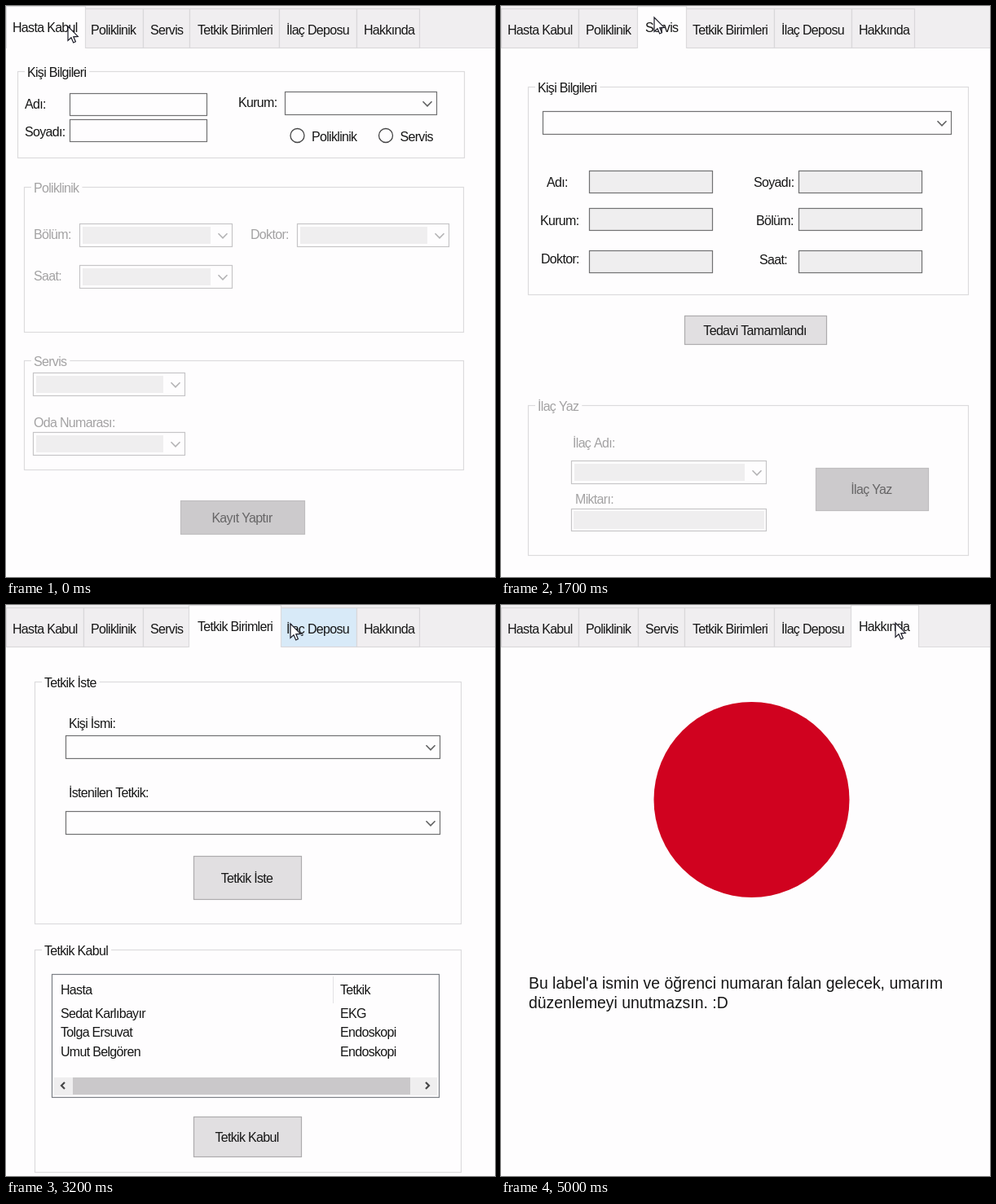
Recreate the animation shown at these times as an HTML page with a canvas. Size 600 by 701 pixels, loop 5100 ms.

```html
<!DOCTYPE html>
<html lang="tr">
<head>
<meta charset="utf-8">
<title>Hasta kayıt</title>
<style>
html, body { margin: 0; width: 100%; height: 100%; overflow: hidden; background: #fefdfe; }
canvas { display: block; }
</style>
</head>
<body>
<canvas id="stage" width="600" height="701"></canvas>
<script>
const ctx = document.getElementById('stage').getContext('2d');
const LOOP = 5100, STEP = 100;
const INK = '#161616', DIM = '#a3a2a3', PAPER = '#fefdfe', SHADE = '#efeeef';
const RULE = '#dcdbdd', EDGE = '#717172', DIM_EDGE = '#c6c5c7';

const TABS = [
  { name: 'Hasta Kabul', x: 0, end: 95, text: 8, open: [0, 98] },
  { name: 'Poliklinik', x: 95, end: 168, text: 104, open: [94, 171] },
  { name: 'Servis', x: 168, end: 225, text: 177, open: [167, 228] },
  { name: 'Tetkik Birimleri', x: 225, end: 335, text: 235, open: [224, 338] },
  { name: 'İlaç Deposu', x: 335, end: 430, text: 344, open: [334, 433] },
  { name: 'Hakkında', x: 430, end: 507, text: 439, open: [429, 513] }
];

// Start times of the selected tab and of the visible page
const TAB_TIMES = [0, 700, 1700, 2900, 3700, 4900];
const PAGE_TIMES = [0, 900, 1800, 2900, 3700, 4900];

// Pointer path: time, x, y
const PATH = [
  [0, 76, 25], [200, 78, 25], [600, 140, 24], [800, 158, 23], [1300, 180, 19],
  [1700, 188, 14], [2000, 196, 18], [2400, 252, 25], [2700, 272, 27], [2900, 282, 26],
  [3200, 349, 23], [3700, 356, 22], [3900, 378, 22], [4200, 468, 22], [4800, 484, 22]
];

function setFont(size, spacing) {
  ctx.font = `${size}px "Liberation Sans", Arial, sans-serif`;
  ctx.letterSpacing = `${spacing}px`;
}

function text(s, x, y, color = INK, align = 'left') {
  setFont(16, -0.68);
  ctx.textAlign = align;
  ctx.fillStyle = color;
  ctx.fillText(s, x, y + 5.5);
}

function fill(x, y, r, b, color) {
  ctx.fillStyle = color;
  ctx.fillRect(x, y, r - x, b - y);
}

function box(x, y, r, b, paint, edge = EDGE) {
  fill(x, y, r, b, paint);
  ctx.strokeStyle = edge;
  ctx.lineWidth = 1.2;
  ctx.strokeRect(x + .5, y + .5, r - x - 1, b - y - 1);
}

function line(points, color, width = 1) {
  ctx.beginPath();
  points.forEach(([x, y]) => ctx.lineTo(x, y));
  ctx.strokeStyle = color;
  ctx.lineWidth = width;
  ctx.stroke();
}

function group(x, y, r, b, label, labelX, color = INK) {
  box(x, y, r + 1, b + 1, PAPER, RULE);
  setFont(16, -0.68);
  fill(labelX - 3, y - 1, labelX + ctx.measureText(label).width + 4, y + 3, PAPER);
  text(label, labelX, y + 1, color);
}

// dx, dy point the way the arrow faces
function chevron(x, y, dx, dy, color, size = 5, width = 1.6) {
  const tip = size / 2;
  line([[x - dx * tip - dy * size, y - dy * tip - dx * size],
    [x + dx * tip, y + dy * tip],
    [x - dx * tip + dy * size, y - dy * tip + dx * size]], color, width);
}

function combo(x, y, r, b, enabled = true) {
  box(x, y, r, b, PAPER, enabled ? EDGE : DIM_EDGE);
  if (!enabled) fill(x + 4, y + 4, r - 27, b - 4, SHADE);
  chevron(r - 12, (y + b) / 2 + .5, 0, 1, enabled ? '#606061' : '#b4b3b5', 5.5);
}

function button(x, y, r, b, label, enabled = true) {
  box(x, y, r, b, enabled ? '#e1dfe1' : '#cccacc', enabled ? '#adabad' : '#bfbdbf');
  text(label, (x + r) / 2 - 1, (y + b) / 2, enabled ? INK : '#666566', 'center');
}

function radio(x, y, label) {
  ctx.beginPath();
  ctx.arc(x, y, 8.5, 0, 7);
  ctx.strokeStyle = '#454546';
  ctx.lineWidth = 1.3;
  ctx.stroke();
  text(label, x + 17.5, y + 1);
}

// Two columns of read-only fields: label, label x, label y, field y
function details(fields) {
  fields.forEach(([label, x, labelY, y], i) => {
    const left = i % 2 ? 365 : 108;
    text(label, x, labelY);
    box(left, y, left + 152, y + 28, SHADE);
  });
}

function admissionPage() {
  group(14, 80, 562, 186, 'Kişi Bilgileri', 26);
  text('Adı:', 23, 120);
  box(78, 107, 247, 135, PAPER);
  text('Soyadı:', 23, 154);
  box(78, 139, 247, 167, PAPER);
  text('Kurum:', 285, 118);
  combo(342, 105, 529, 134);
  radio(357.5, 159, 'Poliklinik');
  radio(466, 159, 'Servis');

  group(22, 222, 561, 400, 'Poliklinik', 34, DIM);
  text('Bölüm:', 34, 280, DIM);
  combo(90, 267, 278, 296, false);
  text('Doktor:', 300, 280, DIM);
  combo(357, 267, 544, 296, false);
  text('Saat:', 34, 331, DIM);
  combo(90, 318, 278, 347, false);

  group(22, 435, 561, 569, 'Servis', 34, DIM);
  combo(33, 450, 220, 479, false);
  text('Oda Numarası:', 34, 511, DIM);
  combo(33, 523, 220, 552, false);
  button(214, 607, 367, 649, 'Kayıt Yaptır', false);
}

function clinicPage() {
  group(33, 99, 573, 354, 'Kişi Bilgileri', 45);
  combo(51, 129, 553, 158);
  details([
    ['Adı:', 56, 216, 202], ['Soyadı:', 310, 216, 202],
    ['Kurum:', 48, 263, 248], ['Bölüm:', 313, 263, 248],
    ['Doktor:', 49, 310, 300], ['Saat:', 317, 311, 300]
  ]);
  button(225, 380, 400, 416, 'Tedavi Tamamlandı');

  group(33, 490, 573, 674, 'İlaç Yaz', 45, DIM);
  text('İlaç Adı:', 88, 536, DIM);
  combo(86, 558, 326, 587, false);
  text('Miktarı:', 91, 605, DIM);
  box(86, 617, 326, 645, PAPER, DIM_EDGE);
  fill(89, 620, 323, 642, SHADE);
  button(386, 567, 525, 620, 'İlaç Yaz', false);
}

function wardPage() {
  group(33, 98, 573, 353, 'Kişi Bilgileri', 45);
  combo(51, 128, 553, 157);
  details([
    ['Adı:', 56, 215, 201], ['Soyadı:', 310, 215, 201],
    ['Kurum:', 48, 262, 246], ['Servis:', 313, 262, 246],
    ['Oda No:', 47, 311, 299], ['Kat:', 320, 311, 299]
  ]);
  button(182, 416, 416, 485, 'Tedavi Tamamlandı');
}

function testsPage() {
  group(35, 94, 558, 391, 'Tetkik İste', 47);
  text('Kişi İsmi:', 77, 145);
  combo(73, 160, 533, 189);
  text('İstenilen Tetkik:', 77, 230);
  combo(73, 253, 533, 282);
  button(230, 308, 363, 362, 'Tetkik İste');

  group(35, 423, 558, 696, 'Tetkik Kabul', 47);
  box(56, 453, 532, 605, PAPER, '#7b7f85');
  text('Hasta', 67, 472);
  text('Tetkik', 410, 472);
  fill(401, 456, 402, 489, '#e3e2e4');
  const rows = [['Sedat Karlıbayır', 'EKG'], ['Tolga Ersuvat', 'Endoskopi'], ['Umut Belgören', 'Endoskopi']];
  rows.forEach(([patient, test], i) => {
    text(patient, 67, 501 + i * 23.5);
    text(test, 410, 501 + i * 23.5);
  });
  fill(59, 580, 529, 602, SHADE);
  fill(82, 580, 496, 601, '#cac8ca');
  chevron(70, 590, -1, 0, '#464647', 4, 2.2);
  chevron(517, 590, 1, 0, '#464647', 4, 2.2);
  button(230, 628, 363, 678, 'Tetkik Kabul');
}

function stockPage() {
  text('Hastane Deposundaki İlaçlar:', 34, 109);
  box(33, 137, 563, 418, PAPER, '#7b7f85');
  text('İlaçlar', 44, 156);
  text('Miktarı', 208, 156);
  fill(199, 139, 200, 172, '#e3e2e4');
  fill(282, 139, 283, 172, '#e3e2e4');
  const stock = [
    ['Lobirak', 342], ['Undosel', 858], ['Kelodurine', 639], ['Bolvaristin', 158],
    ['Umbrolt Fort', 934], ['Ildoraven', 168], ['Fupleran', 728], ['Zubinol', 178],
    ['Weblositan', 283], ['Mufadorin', 282], ['Hevostan', 157]
  ];
  ctx.save();
  ctx.beginPath();
  ctx.rect(34, 138, 503, 278);
  ctx.clip();
  stock.forEach(([drug, amount], i) => {
    text(drug, 44, 184.5 + i * 23.4);
    text(amount, 208, 184.5 + i * 23.4);
  });
  ctx.restore();
  fill(538, 139, 560, 416, SHADE);
  fill(538, 163, 559, 372, '#cac8ca');
  chevron(548, 152, 0, -1, '#464647', 4.5, 2.2);
  chevron(548, 405, 0, 1, '#464647', 4.5, 2.2);

  group(33, 466, 562, 661, 'İlaç Ekle', 45);
  text('İlaç:', 74, 536);
  box(110, 522, 312, 550, PAPER);
  text('Miktarı:', 54, 582);
  box(110, 572, 312, 599, PAPER);
  button(351, 522, 493, 594, 'İlaç Ekle');
}

function aboutPage() {
  ctx.beginPath();
  ctx.arc(307.5, 239, 120, 0, 7);
  ctx.fillStyle = '#d0021f';
  ctx.fill();
  setFont(19.4, 0);
  ctx.textAlign = 'left';
  ctx.fillStyle = INK;
  ctx.fillText("Bu label'a ismin ve öğrenci numaran falan gelecek, umarım", 34, 471);
  ctx.fillText('düzenlemeyi unutmazsın. :D', 34, 495);
}

const PAGES = [admissionPage, clinicPage, wardPage, testsPage, stockPage, aboutPage];

function drawTabs(selected, pointerX) {
  fill(0, 0, 600, 52, '#f0eef0');
  fill(0, 51, 600, 52, RULE);
  TABS.forEach((tab, i) => {
    if (i === selected) return;
    const hover = pointerX >= tab.x && pointerX < tab.end;
    box(tab.x, 3, tab.end + 1, 52, hover ? '#d8eaf8' : '#f0eef0', '#d9d8da');
    text(tab.name, tab.text, 29);
  });
  const tab = TABS[selected], [x, r] = tab.open;
  box(x, 0, r, 54, PAPER, RULE);
  fill(x - 1, 52, r + 1, 56, PAPER);
  text(tab.name, tab.text, 26.5);
}

function pointerAt(t) {
  const next = PATH.findIndex(p => p[0] > t);
  if (next < 0) return PATH[PATH.length - 1].slice(1);
  const [t0, x0, y0] = PATH[next - 1], [t1, x1, y1] = PATH[next];
  const k = (t - t0) / (t1 - t0);
  return [x0 + (x1 - x0) * k, y0 + (y1 - y0) * k];
}

function drawPointer(x, y) {
  ctx.save();
  ctx.translate(x, y);
  ctx.beginPath();
  [[0, 0], [0, 17.5], [4, 13.8], [6.7, 20], [9.4, 18.8], [6.8, 12.8], [12.3, 12.4]]
    .forEach(([px, py]) => ctx.lineTo(px, py));
  ctx.closePath();
  ctx.fillStyle = '#fff';
  ctx.fill();
  ctx.strokeStyle = '#1c1c28';
  ctx.lineWidth = 1.2;
  ctx.stroke();
  ctx.restore();
}

const current = (times, t) => times.filter(start => start <= t).length - 1;

function draw(now) {
  const t = Math.floor(now % LOOP / STEP) * STEP;
  const [x, y] = pointerAt(t);
  fill(0, 0, 600, 701, PAPER);
  PAGES[current(PAGE_TIMES, t)]();
  drawTabs(current(TAB_TIMES, t), x);
  drawPointer(x, y);
}

let start;
function tick(now) {
  start ??= now;
  draw(now - start);
  requestAnimationFrame(tick);
}
draw(0);
requestAnimationFrame(tick);
</script>
</body>
</html>
```
